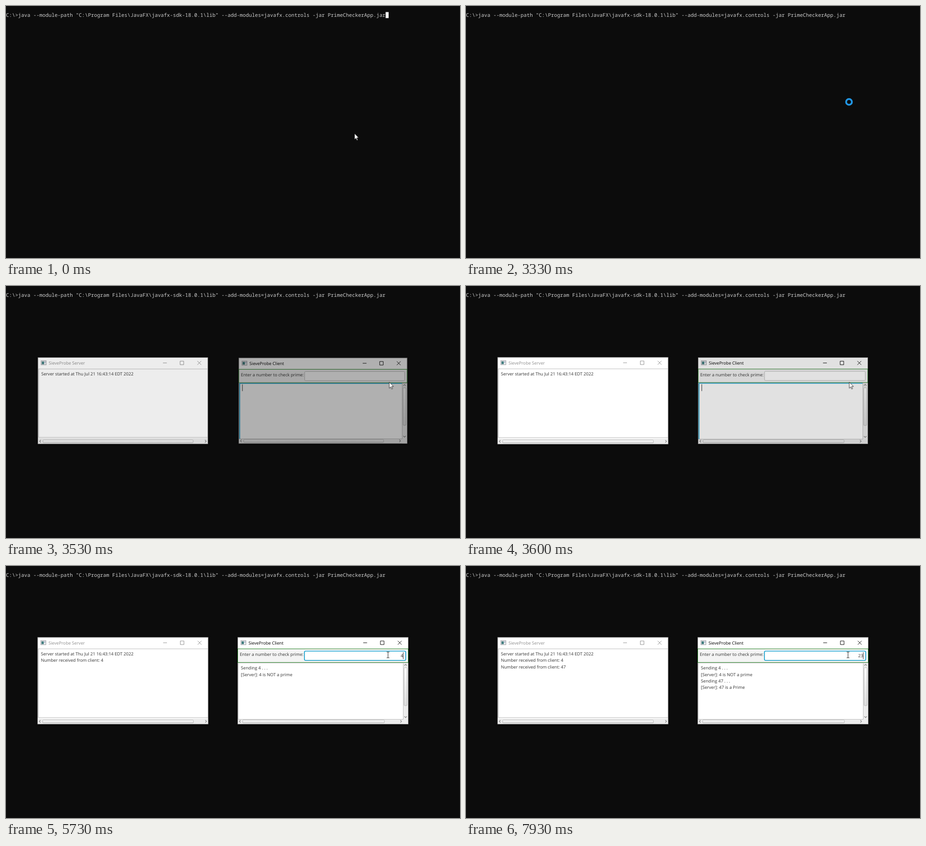
Animation of 1004 by 558 pixels, one loop 8 s. Source, as an HTML page:

```html
<!DOCTYPE html>
<html lang="en">
<head>
<meta charset="utf-8">
<title>Prime number client and server</title>
<style>
  html, body { margin: 0; width: 100%; height: 100%; overflow: hidden; background: #0c0c0c; }
  svg { display: block; width: 1004px; height: 558px; }
  text { font: 9.57px "Open Sans", "Noto Sans", sans-serif; fill: #333; white-space: pre; text-rendering: geometricPrecision; }
  .shell { font: 11.2px "Noto Sans Mono", "DejaVu Sans Mono", monospace; fill: #ccc; }
  #server { color: #8f8f8f; transform-origin: 258.5px 254px; }
  #client { color: #000; transform-origin: 700.8px 254px; }
  .title { fill: currentColor; }
  .frame { filter: drop-shadow(1px 1px 2px #000); }
  .bar { fill: #ececec; }
  .thumb { fill: url(#knob); stroke: #a9a9a9; stroke-width: .8; }
  .arrow { fill: none; stroke: #777; stroke-width: 1.1; }
  .edge { fill: none; stroke: #bcbcbc; }
  .focus { fill: none; stroke: #0c9fd0; stroke-width: 1.6; }
  .caret { stroke: #222; stroke-width: 1; }
  .field { fill: #fff; stroke: #b8b8b8; }
</style>
</head>
<body>
<svg viewBox="0 0 1004 558">
  <defs>
    <linearGradient id="knob" x2="0" y2="1">
      <stop stop-color="#fff"/><stop offset="1" stop-color="#dedede"/>
    </linearGradient>
    <g id="chrome">
      <rect class="frame" x=".5" y=".5" width="377" height="192" fill="#fff" stroke="#8c8c8c"/>
      <rect x="7.5" y="7.6" width="11.2" height="9.2" fill="#eee" stroke="#8c8c94" stroke-width=".9"/>
      <path d="M9 9.4h5v6H9z" fill="#3f7b7d"/>
      <path d="M15 9.4h2.4v3H15z" fill="#a9b7cf"/>
      <path d="M278 12.5h8.5M316 8.5h8v8h-8zM354.4 8.2l8.5 8.5m0-8.5l-8.5 8.5" fill="none" stroke="currentColor"/>
    </g>
  </defs>

  <text class="shell" x="0" y="24.2">C:\&gt;java --module-path "C:\Program Files\JavaFX\javafx-sdk-18.0.1\lib" --add-modules=javafx.controls -jar PrimeCheckerApp.jar</text>
  <rect id="block" x="839.5" y="13.4" width="6.7" height="13.4" fill="#f2f2f2"/>
  <rect id="under" x="839.5" y="23.6" width="6.7" height="3" fill="#f2f2f2"/>
  <rect id="under2" x="0" y="37" width="6.7" height="3" fill="#f2f2f2"/>

  <g id="server"><g transform="translate(69.5 157.5)">
    <use href="#chrome"/>
    <text class="title" x="24.4" y="16.2">SieveProbe Server</text>
    <g class="content">
      <path class="edge" d="M1 26H377M2 26V178H377"/>
      <rect class="bar" x="1" y="180" width="376" height="12"/>
      <rect class="thumb" x="11.5" y="183.6" width="333.5" height="6.4" rx="1.5"/>
      <path class="arrow" d="M6.8 183.8l-2.8 2.8 2.8 2.8M371.2 183.8l2.8 2.8-2.8 2.8"/>
    </g>
    <g id="serverLog"></g>
  </g></g>

  <g id="client"><g transform="translate(512 157.5)">
    <use href="#chrome"/>
    <text class="title" x="24.2" y="16.2">SieveProbe Client</text>
    <g class="content">
      <rect x=".5" y="26" width="377" height="30" fill="#f4f4f4" stroke="#1c7a1c"/>
      <text x="5" y="41.8">Enter a number to check prime:</text>
      <rect class="field" x="148" y="31" width="224" height="20.5" rx="2"/>
      <path class="edge" d="M1 57.5H377M1.5 57V182"/>
      <rect class="bar" x="366.5" y="58" width="10.5" height="134"/>
      <rect class="bar" x="1" y="182" width="376" height="10"/>
      <path class="edge" d="M366.5 58V182H1"/>
      <rect class="thumb" x="368.4" y="67.6" width="6.6" height="84" rx="1.5"/>
      <rect class="thumb" x="11.3" y="183.6" width="313.5" height="6.4" rx="1.5"/>
      <path class="arrow" d="M6.8 183.8l-2.8 2.8 2.8 2.8M360 183.8l2.8 2.8-2.8 2.8M368.9 63l2.8-2.8 2.8 2.8M368.9 175.4l2.8 2.8 2.8-2.8"/>
    </g>
    <path id="areaFocus" class="focus" d="M2.4 182V57.8H366"/>
    <path id="areaCaret" class="caret" d="M8.5 60V75"/>
    <rect id="fieldFocus" class="focus" x="148" y="31" width="224" height="20.5" rx="2.5"/>
    <path id="fieldCaret" class="caret" d="M366.4 33.5V48.5"/>
    <g id="clientLog"></g>
    <g id="entry"></g>
  </g></g>

  <path id="pointer" d="M0 0V13.6L3.1 10.6 5.3 15.4 7.3 14.5 5.1 9.8H9.3z" fill="#fff" stroke="#000" stroke-width=".8"/>
  <path id="ibeam" d="M-3-6.5h2.2l.8.7.8-.7H3M0-6V6M-3 6.5h2.2L0 5.8l.8.7H3" fill="none" stroke="#111"/>
  <circle id="busy" cx="847" cy="212.4" r="6.4" fill="none" stroke="#2196e3" stroke-width="4"/>
</svg>

<script>
  const TICKS = 120, LOOP = 8000;   // 15 ticks per second
  const $ = id => document.getElementById(id);

  // Hold each value in the table [tick, value] until the next one.
  function hold(el, prop, table) {
    const frames = table.map(([tick, value]) => ({
      offset: Math.max(0, tick - 0.06) / TICKS, [prop]: value, easing: 'step-end'
    }));
    frames.push({ offset: 1, [prop]: table.at(-1)[1] });
    el.animate(frames, { duration: LOOP, iterations: Infinity });
  }

  // Make an element visible only within the given [from, to) spans.
  function show(el, ...spans) {
    const table = spans[0][0] > 0 ? [[0, 'hidden']] : [];
    for (const [from, to] of spans) {
      table.push([from, 'visible']);
      if (to < TICKS) table.push([to, 'hidden']);
    }
    hold(el, 'visibility', table);
  }

  function addText(parent, x, y, string, from, to = TICKS, anchor = 'start') {
    const el = document.createElementNS('http://www.w3.org/2000/svg', 'text');
    el.setAttribute('x', x);
    el.setAttribute('y', y);
    el.setAttribute('text-anchor', anchor);
    el.textContent = string;
    parent.append(el);
    show(el, [from, to]);
  }

  function log(id, x, y, lines) {
    lines.forEach(([tick, string], i) => addText($(id), x, y + i * 14.35, string, tick));
  }

  // Rows: tick, opacity, scale
  function openWindow(id, rows) {
    hold($(id), 'opacity', [[0, 0], ...rows.map(r => [r[0], r[1]])]);
    hold($(id), 'transform', [[0, 'scale(.96)'], ...rows.map(r => [r[0], `scale(${r[2]})`])]);
  }

  const at = (x, y) => `translate(${x}px, ${y}px)`;

  // Console
  show($('block'), [0, 24]);
  show($('under'), [32, 38]);
  show($('under2'), [38, 40]);

  // Windows
  openWindow('server', [[51, .42, .972], [52, .74, .987], [53, .93, .996], [54, 1, 1]]);
  openWindow('client', [[52, .39, .972], [53, .68, .987], [54, .88, .995], [55, .97, .999], [56, 1, 1]]);
  document.querySelectorAll('.content').forEach(el => show(el, [53, TICKS]));
  show($('areaFocus'), [53, 76]);
  show($('areaCaret'), [53, 60], [67, 76]);
  show($('fieldFocus'), [76, TICKS]);
  show($('fieldCaret'), [76, 94], [95, TICKS]);

  log('serverLog', 7.7, 40.6, [
    [53, 'Server started at Thu Jul 21 16:43:14 EDT 2022'],
    [86, 'Number received from client: 4'],
    [103, 'Number received from client: 47']
  ]);
  log('clientLog', 7.6, 71.8, [
    [86, 'Sending 4 . . .'],
    [86, '[Server]: 4 is NOT a prime'],
    [103, 'Sending 47 . . .'],
    [103, '[Server]: 47 is a Prime']
  ]);
  for (const [from, to, digits] of [
    [80, 95, '4'], [95, 110, '47'], [110, 112, '4'], [117, 119, '2'], [119, TICKS, '23']
  ]) addText($('entry'), 366.2, 44.8, digits, from, to, 'end');

  // Mouse
  const path = Array.from({ length: 11 }, (_, i) => {
    const u = i / 10, k = u * u * (3 - 2 * u);
    return [i, at(770.8 + 76.8 * k, 282.2 - 69.4 * k)];
  });
  hold($('pointer'), 'transform', [...path, [71, at(847.4, 210.5)]]);
  show($('pointer'), [0, 50], [52, 72]);
  show($('busy'), [50, 52]);
  hold($('ibeam'), 'transform', [
    [0, at(847, 205)], [73, at(846, 201)], [74, at(845, 198)], [75, at(844.8, 196.8)]
  ]);
  show($('ibeam'), [72, TICKS]);
</script>
</body>
</html>
```
